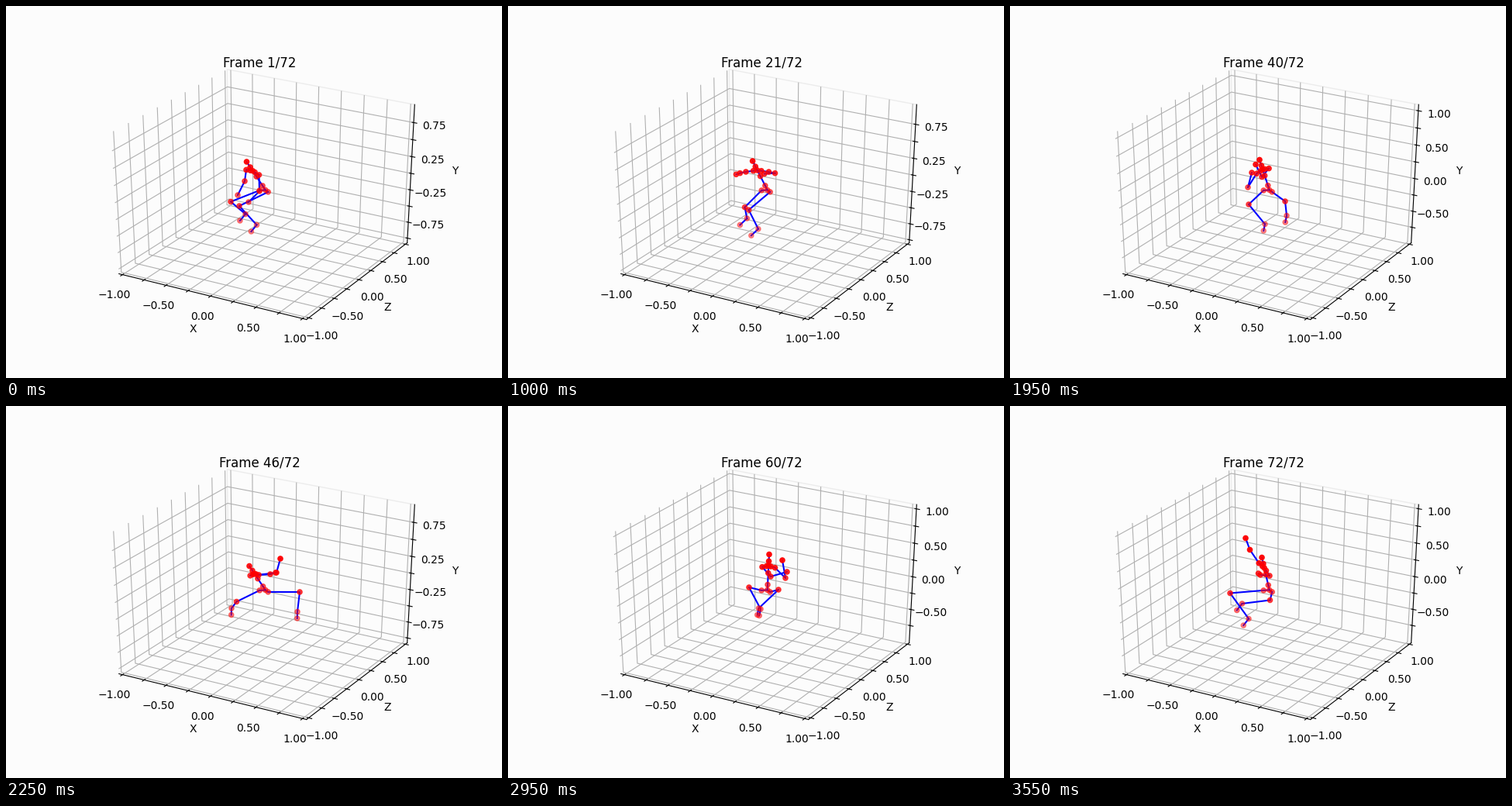
These frames come from a looping animation (640 px wide and 480 px high, 3.6 s). A matplotlib script:

```python
import numpy as np
import matplotlib.pyplot as plt
from matplotlib.animation import FuncAnimation
from matplotlib.collections import LineCollection

FRAMES, INTERVAL = 72, 50
ELEV, AZIM, DIST = np.radians(30), np.radians(-60), 10
EDGE = 0.5 + 1 / 48          # half size of the drawn box
DELTA = 1 / 12               # unit for tick and label offsets
TICK_PAD, LABEL_PAD = 0.8857 * DELTA, 1.9255 * DELTA
KEYS = np.array([0, 9, 29, 39, 45, 59, 71])


def project(x, y, z):
    """Perspective view of a point in the unit box centred on 0, in pixels."""
    ca, sa, ce, se = np.cos(AZIM), np.sin(AZIM), np.cos(ELEV), np.sin(ELEV)
    across = -sa * x + ca * y
    up = -(ca * x + sa * y) * se + z * ce
    away = DIST - ((ca * x + sa * y) * ce + z * se)
    return (80 + 496 / 0.185 * (0.095 + across / away),
            427.2 - 369.6 / 0.185 * (0.095 + up / away))


def path(*points):
    return [project(*p) for p in points]


def spline(values):
    """Smooth curve through the key values without overshoot, per frame."""
    v = np.asarray(values, float)
    gaps = np.diff(KEYS)[:, None]
    d = np.diff(v, axis=0) / gaps
    prod, total = d[:-1] * d[1:], d[:-1] + d[1:]
    same = prod > 0
    inner = np.where(same, 2 * prod / np.where(same, total, 1), 0)
    m = np.vstack([d[:1], inner, d[-1:]])
    f = np.arange(FRAMES)
    i = np.clip(np.searchsorted(KEYS, f, side="right") - 1, 0, len(KEYS) - 2)
    h = gaps[i]
    t = (f[:, None] - KEYS[i][:, None]) / h
    return ((2 * t**3 - 3 * t**2 + 1) * v[i] + (t**3 - 2 * t**2 + t) * h * m[i]
            + (3 * t**2 - 2 * t**3) * v[i + 1] + (t**3 - t**2) * h * m[i + 1])


def mix(a, b, k):
    return a + (b - a) * k


def pose(head, elbows, wrists, knees, ankles):
    return np.ravel([head, *elbows, *wrists, *knees, *ankles])


def shaded(point, lift=0.0):
    """Add an opacity: joints higher up are nearer to the viewer."""
    shade = np.interp(point[:, 1], [198, 237, 290], [0.95, 0.58, 0.42])
    return np.column_stack([point, np.minimum(shade + lift, 1)])


# Key poses; pairs are the limbs on the left and the right
crouch = pose(head=(310.5, 201), elbows=[(308, 226), (327, 239)],
              wrists=[(299, 244), (313, 253)],
              knees=[(290, 252.5), (301, 258)],
              ankles=[(309, 268.5), (323.5, 282.5)])
rise = pose(head=(320.5, 199), elbows=[(293, 208), (357.5, 198.5)],
            wrists=[(291, 197.5), (344, 189.5)],
            knees=[(317, 265), (326, 267)],
            ankles=[(308, 279.5), (322.5, 291.5)])
fold = pose(head=(322, 198.5), elbows=[(307, 234), (325, 220.5)],
            wrists=[(312, 215), (317, 204.5)],
            knees=[(308, 256), (355, 252)],
            ankles=[(329, 281.5), (357, 270.5)])
lunge = pose(head=(314, 206.5), elbows=[(341, 217), (349, 215)],
             wrists=[(348, 215), (354, 197)],
             knees=[(297.5, 252.5), (379, 240)],
             ankles=[(291, 261), (376, 265.5)])
sit = pose(head=(337, 191.5), elbows=[(339, 220), (358, 222)],
           wrists=[(360, 214), (354, 199)],
           knees=[(311, 234), (349, 237)],
           ankles=[(326, 262), (323.5, 261)])
reach = pose(head=(325, 195.5), elbows=[(309.5, 185.5), (323, 218)],
             wrists=[(304, 170.5), (320.5, 216)],
             knees=[(284, 241.5), (335.5, 250.5)],
             ankles=[(308, 274.5), (299.5, 255)])

body = spline([crouch, crouch, rise, fold, lunge, sit, reach])
body = body.reshape(FRAMES, 9, 2).swapaxes(0, 1)
head, elbows, wrists, knees, ankles = (body[0], body[1:3], body[3:5],
                                       body[5:7], body[7:9])

# The rest of the body follows from the key joints
root = np.tile(project(0, 0, 0), (FRAMES, 1))
chest = mix(head, root, 0.32)
neck = mix(head, chest, 0.6)
span = (elbows[1] - elbows[0]) / 2 + (7, 0)
sway = 2 * np.pi * (np.arange(FRAMES) / FRAMES - 0.68)
foot_step = np.column_stack([5 * np.cos(sway) - 5, np.full(FRAMES, 8.5)])
hip_steps = (-7.5, 0.5), (3.5, 2.5)

torso = (root, mix(root, chest, 0.22), mix(root, chest, 0.7), chest, neck, head)
chains = [[shaded(p) for p in torso]]
for k, side in enumerate((-0.5, 0.5)):
    shoulder = chest + (0, 2) + side * span
    arm = (chest, mix(chest, shoulder, 0.35), shoulder, elbows[k], wrists[k])
    chains.append([shaded(p) for p in arm])
    chains.append([shaded(root), shaded(root + hip_steps[k]),
                   shaded(knees[k], lift=0.15), shaded(ankles[k]),
                   shaded(ankles[k] + foot_step)])
joints = np.array(chains[0] + [j for c in chains[1:] for j in c[1:]])

# Middle of the vertical range, which follows the body
centre = spline(np.c_[[-.032, -.02, .008, .047, -.035, .02, .018]])[:, 0]

fig = plt.figure(figsize=(6.4, 4.8), dpi=100, facecolor="#fcfcfc")
ax = fig.add_axes([0, 0, 1, 1])
ax.set(xlim=(0, 640), ylim=(480, 0))
ax.axis("off")


def add_lines(paths, color, width, z, cap="butt"):
    lines = LineCollection(paths, colors=color, linewidths=width, zorder=z,
                           capstyle=cap)
    ax.add_collection(lines, autolim=False)
    return lines


def add_label(point, text="", va="top"):
    return ax.text(*point, text, size=10, ha="center", va=va, zorder=3)


def number(value):
    return f"{value:.2f}".replace("-", "\u2212")


E, OUT, LAB = EDGE, EDGE + TICK_PAD, EDGE + LABEL_PAD
T_OUT, T_IN = EDGE + .2 * DELTA, EDGE - .1 * DELTA

# Rim of the back wall
add_lines([path((-E, E, -E), (-E, E, E), (E, E, E), (E, E, -E))],
          "#ececec", 1, 0.5)

# Floor axes
grid, ticks = [], []
for k, v in enumerate(np.arange(-4, 5) / 4):
    p = v / 2
    grid += [path((p, -E, -E), (p, E, -E), (p, E, E)),
             path((E, p, -E), (-E, p, -E), (-E, p, E))]
    ticks += [path((p, -T_OUT, -E), (p, -T_IN, -E)),
              path((T_OUT, p, -E), (T_IN, p, -E))]
    if k % 2 == 0:
        add_label(project(p, -OUT, -OUT), number(v))
        add_label(project(OUT, p, -OUT), number(v))
add_lines(grid, "#b0b0b0", 0.8, 1)
add_lines(ticks, "black", 0.8, 2, "projecting")
add_lines([path((-E, -E, -E), (E, -E, -E)), path((E, -E, -E), (E, E, -E)),
           path((E, E, -E), (E, E, E))], "black", 0.8, 2, "projecting")
add_label(project(0, -LAB, -LAB), "X", "center")
add_label(project(LAB, 0, -LAB), "Z", "center")
add_label(project(LAB, LAB, 0), "Y", "center")

# Parts that change
level_grid = add_lines([], "#b0b0b0", 0.8, 1)
level_ticks = add_lines([], "black", 0.8, 2, "projecting")
level_labels = [add_label((0, 0)) for _ in range(4)]
bones = add_lines([], "blue", 1.5, 4, "projecting")
dots = ax.scatter(joints[:, 0, 0], joints[:, 0, 1], s=20, linewidths=1,
                  zorder=5)
title = ax.text(327.4, 78.8, "", size=12, ha="center", va="baseline")


def update(frame):
    c = centre[frame]
    levels = np.arange(-5, 6) / 4
    levels = levels[abs(levels - c) <= 1]
    rel = (levels - c) / 2
    level_grid.set_segments([path((-E, -E, z), (-E, E, z), (E, E, z))
                             for z in rel])
    level_ticks.set_segments([path((T_IN, E, z), (T_OUT, E, z)) for z in rel])
    for label, v, z in zip(level_labels, levels[1::2], rel[1::2]):
        label.set_position(project(OUT, OUT, z))
        label.set_text(number(v))

    bones.set_segments([[a[frame, :2], b[frame, :2]]
                        for chain in chains for a, b in zip(chain, chain[1:])])
    now = joints[:, frame]
    now = now[np.argsort(now[:, 2], kind="stable")]   # far joints first
    colors = np.zeros((len(now), 4))
    colors[:, 0] = 1
    colors[:, 3] = now[:, 2]
    dots.set_offsets(now[:, :2])
    dots.set_facecolors(colors)
    dots.set_edgecolors(colors)
    title.set_text(f"Frame {frame + 1}/{FRAMES}")
    return level_grid, level_ticks, *level_labels, bones, dots, title


anim = FuncAnimation(fig, update, frames=FRAMES, interval=INTERVAL,
                     repeat=True, repeat_delay=0)
plt.show()
```
